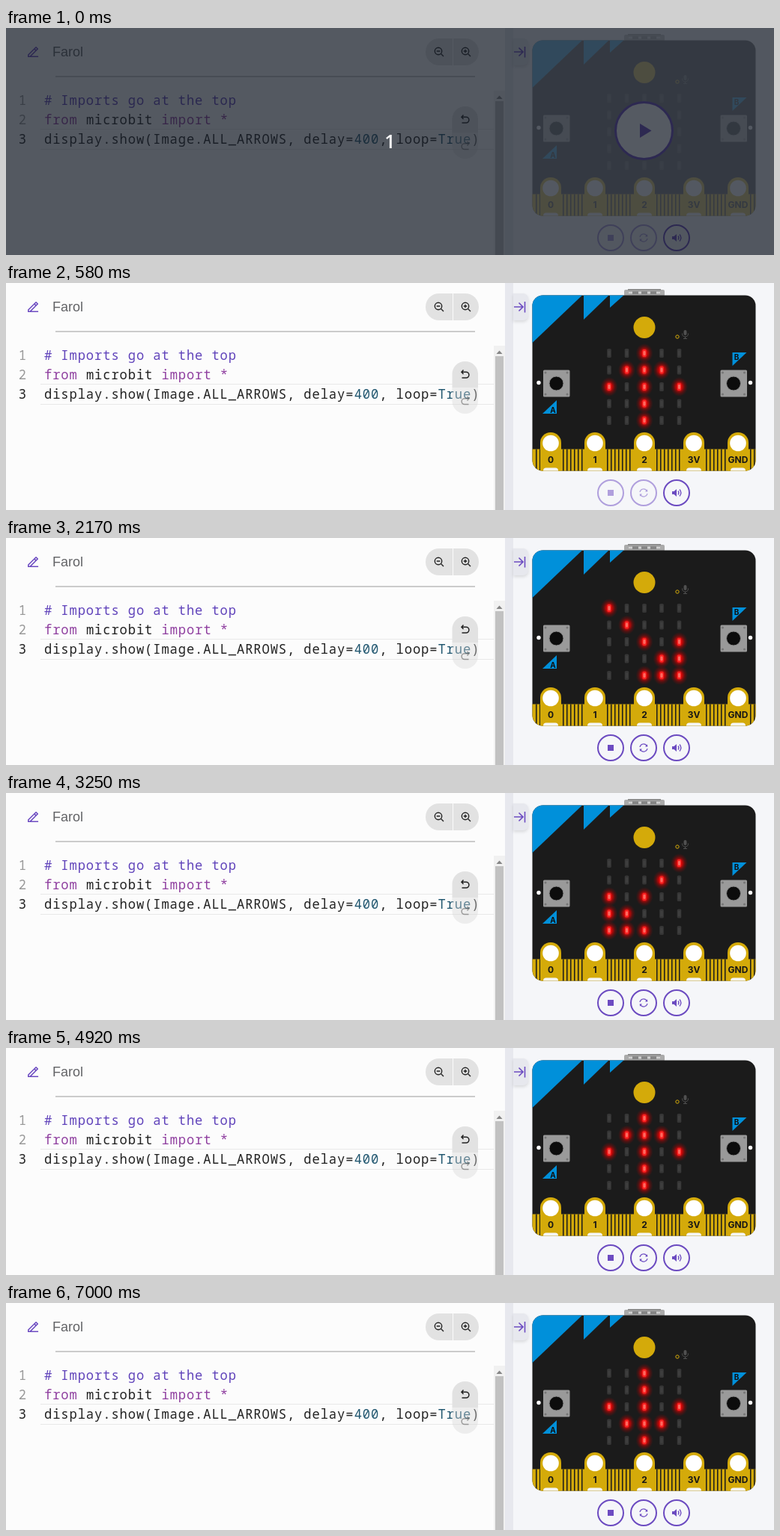
Recreate the animation shown at these times as an HTML page with a canvas. Size 1025 px wide and 304 px high, loop 7.58 s.

```html
<!DOCTYPE html>
<html lang="es">
<head>
<meta charset="utf-8">
<title>Farol</title>
<style>
  html, body { margin: 0; width: 100%; height: 100%; overflow: hidden; background: #fcfcfc; }
  canvas { display: block; }
</style>
</head>
<body>
<canvas id="stage" width="1025" height="304"></canvas>
<script>
const W = 1025, H = 304, LOOP = 7580;
const PURPLE = '#6c4bc1', INK = '#222222', GOLD = '#d4aa0a', BLUE = '#0090da';
const BOARD = '#1b1b1b', SIM = '#f5f6f9', PILL = '#e2e2e2';
const MONO = '500 17.2px "Noto Sans Mono", monospace';
const COLS = [805, 828.5, 852, 875, 898.5];
const ROWS = [94, 116.5, 139, 161.5, 184];

// Start times of successive arrows, turning clockwise from north
const TURNS = [580, 1170, 1670, 2170, 2750, 3250, 3830, 4330, 4920, 5420, 6000, 6500, 7000];
const NORTH = ['00100', '01110', '10101', '00100', '00100'];
const NORTHEAST = ['00111', '00011', '00101', '01000', '10000'];

const stage = document.getElementById('stage').getContext('2d');
let c = stage;

function layer(draw) {
  const el = document.createElement('canvas');
  el.width = W;
  el.height = H;
  c = el.getContext('2d');
  draw();
  c = stage;
  return el;
}

function rect(x, y, w, h, color) {
  c.fillStyle = color;
  c.fillRect(x, y, w, h);
}

function round(x, y, w, h, r, color) {
  c.beginPath();
  c.roundRect(x, y, w, h, r);
  c.fillStyle = color;
  c.fill();
}

function disc(x, y, r, fill, stroke, width) {
  c.beginPath();
  c.arc(x, y, r, 0, Math.PI * 2);
  if (fill) { c.fillStyle = fill; c.fill(); }
  if (stroke) { c.strokeStyle = stroke; c.lineWidth = width; c.stroke(); }
}

function poly(color, ...p) {
  c.beginPath();
  for (let i = 0; i < p.length; i += 2) c.lineTo(p[i], p[i + 1]);
  c.closePath();
  c.fillStyle = color;
  c.fill();
}

function text(s, x, y, font, color, align = 'left', spacing = 0) {
  c.font = font;
  c.textAlign = align;
  c.letterSpacing = spacing + 'px';
  c.fillStyle = color;
  c.fillText(s, x, y);
}

// Icon strokes or fills given as path data, placed at x, y
function icon(d, x, y, color, width, scale = 1) {
  c.save();
  c.translate(x, y);
  c.scale(scale, scale);
  const path = new Path2D(d);
  if (width) {
    c.strokeStyle = color;
    c.lineWidth = width;
    c.stroke(path);
  } else {
    c.fillStyle = color;
    c.fill(path, 'evenodd');
  }
  c.restore();
}

function code(parts, y) {
  let x = 51;
  for (const [s, color] of parts) {
    text(s, x, y, MONO, color, 'left', 0.86);
    x += s.length * 11.18;
  }
}

function drawEditor() {
  rect(0, 0, 666, H, '#fcfcfc');
  icon('M5 18.89h1.414l9.314-9.314-1.414-1.414L5 17.476zM21 20.89H3v-4.243L16.435 3.212a1 1 0 0 1 1.414 0l2.829 2.829a1 1 0 0 1 0 1.414L9.243 18.89H21zM15.728 6.748l1.414 1.414 1.414-1.414-1.414-1.414z',
    26.7, 22.7, PURPLE, 0, 0.78);
  text('Farol', 62, 38, '18px "Liberation Sans", Arial, sans-serif', '#626366');
  rect(66, 64, 560, 2, '#cbcbcb');

  round(560, 14, 71, 36, 18, PILL);
  rect(596, 14, 1, 36, '#fcfcfc');
  for (const x of [577, 613]) {
    disc(x, 31, 4.7, null, INK, 1.4);
    icon('M3.5 3.5L7 7M-2.3 0H2.3', x, 31, INK, 1.4);
  }
  icon('M0 -2.3V2.3', 613, 31, INK, 1.4);

  rect(46, 135, 605, 1, '#e8e8e8');
  rect(46, 162, 605, 1, '#e8e8e8');
  for (let n = 1; n <= 3; n++)
    text(String(n), 27, 77 + 26 * n, MONO, n < 3 ? '#999999' : INK, 'right');

  const key = '#9040a0', num = '#20566f';
  code([['# Imports go at the top', '#6144bb']], 103);
  code([['from', key], [' microbit ', INK], ['import', key], [' ', INK], ['*', key]], 129);
  code([['display.show(Image.ALL_ARROWS, delay=', INK], ['400', num], [', loop=', INK], ['True', num], [')', INK]], 155);

  const turn = 'M-2.5 -6L-5 -3.3L-2.5 -.6M-5 -3.3H1A3.9 3.9 0 0 1 1 4.5H-4.5';
  round(595.5, 105, 34.5, 35, [17, 17, 0, 0], PILL);
  icon(turn, 613, 122.5, INK, 1.5);
  c.globalAlpha = 0.4;
  round(595.5, 140, 34.5, 35, [0, 0, 17, 17], '#d4d4d4');
  c.save();
  c.translate(613, 0);
  c.scale(-1, 1);
  icon(turn, 0, 158, INK, 1.5);
  c.restore();
  c.globalAlpha = 1;

  rect(651, 84, 15, 220, '#f1f1f1');
  poly('#858585', 654.5, 95, 658.5, 90.5, 662.5, 95);
  rect(653, 98, 11, 206, '#c1c1c1');
}

function drawPanel() {
  rect(666, 0, 359, H, SIM);
  rect(666, 0, 11, H, '#e7e8ee');
  c.save();
  c.shadowColor = 'rgba(0,0,0,.12)';
  c.shadowBlur = 4;
  c.shadowOffsetY = 2;
  round(677, 14, 20, 36, [0, 7, 7, 0], '#e7e8ee');
  c.restore();
  icon('M678 32H690M684.5 26.5L690 32L684.5 37.5M692.5 25V39.5', 0, 0, PURPLE, 1.6);
}

function drawUsb() {
  round(825, 9, 54, 9, 2, '#aaaaaa');
  rect(830, 8, 44, 2, '#8c8c8c');
  rect(831, 12, 42, 2, '#d2d2d2');
  for (const x of [836, 848, 860]) rect(x, 11, 8, 4, '#858585');
}

function drawEdge() {
  rect(702, 222.5, 299, 30, GOLD);
  const pins = [[707, 2], [743, 6], [802, 7], [868, 7], [934, 6], [993, 2]];
  for (const [x, n] of pins)
    for (let i = 0; i < n; i++) rect(x + i * 5, 222.5, 1.5, 30, BOARD);

  const pads = [[727, '0'], [786, '1'], [852, '2'], [918, '3V'], [977, 'GND']];
  for (const [x, label] of pads) {
    round(x - 14, 200, 28, 52, [14, 14, 0, 0], GOLD);
    disc(x, 214.5, 10.8, '#ffffff');
    text(label, x, 240.5, 'bold 12px Inter, "Open Sans", sans-serif', '#161616', 'center');
    c.globalCompositeOperation = 'destination-out';
    round(x - 10, 247.5, 20, 8, 4, '#000');
    c.globalCompositeOperation = 'source-over';
  }
}

function drawButton(x) {
  round(x - 17.5, 116.5, 35.5, 36, 1.5, '#9a9a9a');
  for (const dx of [-14.5, 14.5])
    for (const y of [120, 149]) disc(x + dx, y, 1.5, '#777777');
  disc(x, 134.5, 9.5, '#0c0c0c', '#888888', 1);
}

function drawBoard() {
  drawUsb();
  c.save();
  c.beginPath();
  c.roundRect(702.5, 16.5, 298, 235, 14);
  c.clip();
  rect(702, 16, 299, 236, BOARD);
  poly(BLUE, 702, 16, 769.5, 16, 702, 80.5);
  poly(BLUE, 771, 16, 805, 16, 771, 49);
  poly(BLUE, 806, 16, 825, 16, 806, 33);
  drawEdge();
  c.restore();

  disc(852, 59.5, 14.5, GOLD);
  disc(896, 72, 2.2, null, GOLD, 1);
  round(904.5, 63, 4, 7, 2, '#505050');
  icon('M902.5 67.5Q902.5 72 906.5 72Q910.5 72 910.5 67.5M906.5 72V74.5M904 74.5H909', 0, 0, '#505050', 1);

  drawButton(734.5);
  drawButton(971);
  disc(711, 133.5, 2.7, '#ffffff');
  disc(993.5, 133.5, 2.7, '#ffffff');
  const label = 'bold 10px Inter, "Open Sans", sans-serif';
  poly(BLUE, 735, 157, 735, 175, 716, 175);
  text('A', 730, 174, label, '#101010', 'center');
  poly(BLUE, 969.5, 93, 988.5, 93, 969.5, 111);
  text('B', 975, 103, label, '#101010', 'center');

  for (const x of COLS)
    for (const y of ROWS) {
      round(x - 2.8, y - 6, 5.6, 12, 1.5, '#363636');
      rect(x - 1.8, y - 3.5, 3.6, 7, '#3e3e3e');
    }
}

function lamp(x, y) {
  c.save();
  c.translate(x, y);
  c.scale(1, 1.13);
  const glow = c.createRadialGradient(0, 0, 1, 0, 0, 11.5);
  glow.addColorStop(0, 'rgba(255,0,0,.95)');
  glow.addColorStop(0.35, 'rgba(240,0,0,.7)');
  glow.addColorStop(0.65, 'rgba(200,0,0,.3)');
  glow.addColorStop(1, 'rgba(170,0,0,0)');
  disc(0, 0, 11.5, glow);
  c.restore();
  round(x - 2.6, y - 5, 5.2, 10, 1.8, '#ff2222');
  round(x - 1.6, y - 3, 3.2, 6, 1.4, '#ff6a60');
}

function drawArrow(turn) {
  const shape = turn % 2 ? NORTHEAST : NORTH;
  const quarters = (turn >> 1) % 4;
  for (let row = 0; row < 5; row++)
    for (let col = 0; col < 5; col++) {
      if (shape[row][col] !== '1') continue;
      let x = col, y = row;
      for (let q = 0; q < quarters; q++) [x, y] = [4 - y, x];
      lamp(COLS[x], ROWS[y]);
    }
}

function drawPlay(scale) {
  c.save();
  c.translate(851.5, 137.5);
  c.scale(scale, scale);
  disc(0, 0, 38, '#ffffff', PURPLE, 3);
  poly(PURPLE, -5.5, -9.5, 10, 0, -5.5, 9.5);
  c.restore();
}

function drawControls(alpha) {
  c.globalAlpha = alpha;
  disc(807, 281, 17, null, PURPLE, 2);
  rect(803, 277, 8, 8, PURPLE);
  disc(851, 281, 17, null, PURPLE, 2);
  icon('M-5 -1A5.1 5.1 0 0 1 4 -3.2M5 1A5.1 5.1 0 0 1 -4 3.2', 851, 281, PURPLE, 1.2);
  poly(PURPLE, 853, 279.5, 856.3, 279.5, 856, 276.2);
  poly(PURPLE, 849, 282.5, 845.7, 282.5, 846, 285.8);
  c.globalAlpha = 1;

  disc(895, 281, 17, null, PURPLE, 2);
  poly(PURPLE, 889, 279, 891.5, 279, 895, 276, 895, 286, 891.5, 283, 889, 283);
  icon('M897 278.5Q899 281 897 283.5M899 276.5Q902.8 281 899 285.5', 0, 0, PURPLE, 1.3);
}

const scene = layer(() => { drawEditor(); drawPanel(); });
const board = layer(drawBoard);

function controlAlpha(t) {
  if (t < 670) return 0.5;
  if (t < 750) return 0.68;
  return t < 830 ? 0.9 : 1;
}

function render(t) {
  const running = t >= TURNS[0];
  c.drawImage(scene, 0, 0);
  c.globalAlpha = running ? 1 : 0.5;
  c.drawImage(board, 0, 0);
  c.globalAlpha = 1;
  if (running) drawArrow(TURNS.filter(start => start <= t).length - 1);
  else drawPlay(t < 420 ? 1 : 1.07);
  drawControls(controlAlpha(t));

  if (t < 80) {
    rect(0, 0, W, H, 'rgba(22,29,40,.73)');
    text('1', 512.5, 161, '600 25px "Open Sans", "Noto Sans", sans-serif', '#ffffff', 'center');
  }
}

function tick(now) {
  render(now % LOOP);
  requestAnimationFrame(tick);
}
render(0);
requestAnimationFrame(tick);
</script>
</body>
</html>
```
